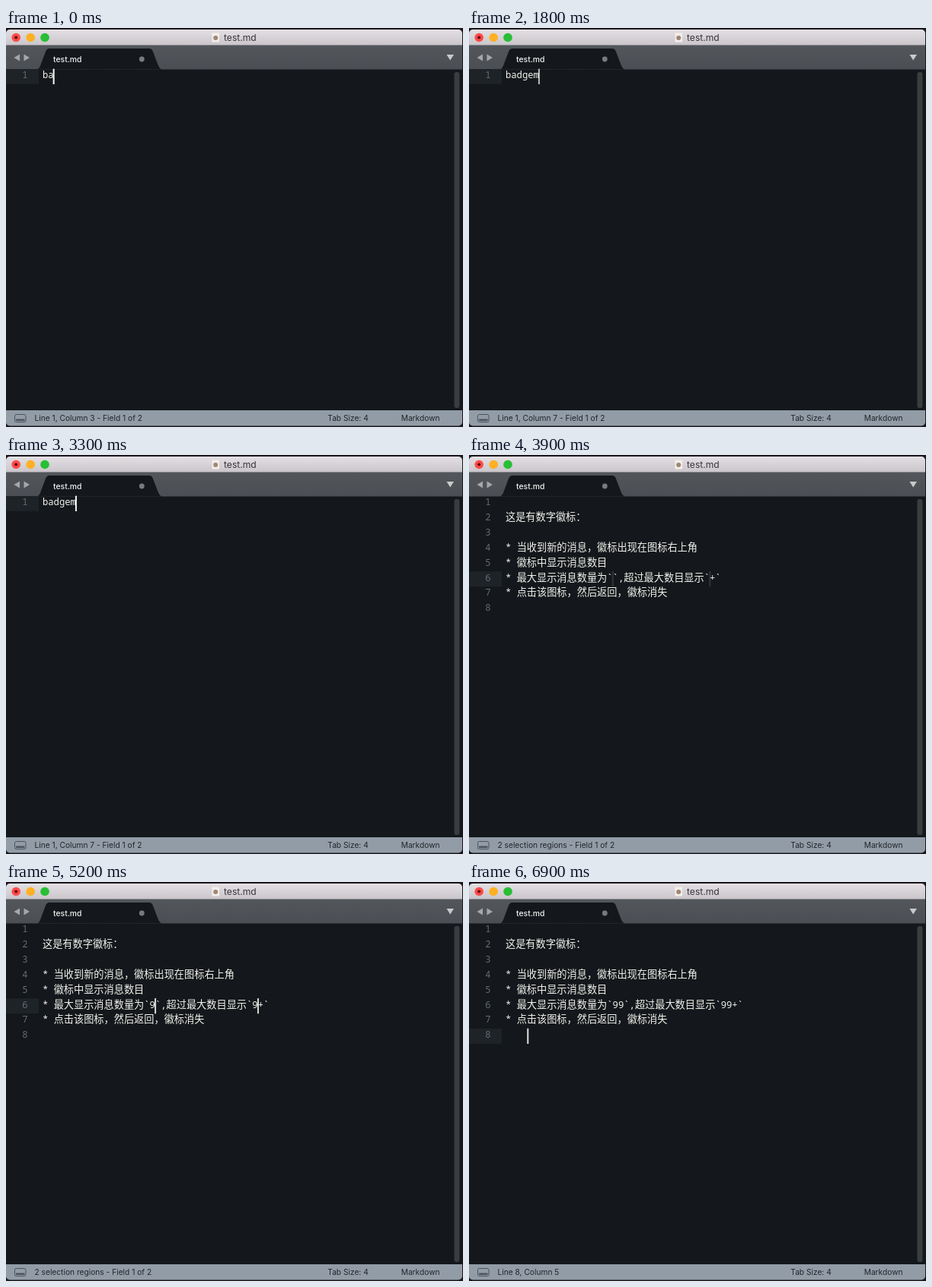
These frames come from a looping animation (600x525 px, 7 s). An HTML page:

```html
<!DOCTYPE html>
<html lang="zh-CN">
<head>
<meta charset="utf-8">
<title>test.md</title>
<style>
  html, body { margin: 0; width: 100%; height: 100%; overflow: hidden; background: #1b171c; }
  svg { display: block; }
  text { white-space: pre; }
  .ui { font-family: Inter, "Liberation Sans", sans-serif; }
  .code { font: 12.2px "Noto Sans Mono", "DejaVu Sans Mono", monospace; fill: #f3f3ed; }
  .cjk { font: 13.2px "Noto Sans CJK SC", "Noto Sans CJK", sans-serif; }
  .num { fill: #656b70; text-anchor: end; }
  .status { font-size: 10.2px; fill: #20252a; }
</style>
</head>
<body>
<svg width="600" height="525" viewBox="0 0 600 525">
  <defs>
    <linearGradient id="title" x2="0" y2="1">
      <stop stop-color="#e3dfe3"/><stop offset="1" stop-color="#c9c5ca"/>
    </linearGradient>
    <linearGradient id="tabs" x2="0" y2="1">
      <stop stop-color="#53575b"/><stop offset="1" stop-color="#4b4f54"/>
    </linearGradient>
    <clipPath id="window"><rect y="2" width="599" height="521.5" rx="5"/></clipPath>
  </defs>
  <rect width="600" height="525" fill="#1b171c"/>
  <g clip-path="url(#window)">
    <rect width="600" height="525" fill="#14181c"/>
    <rect y="2" width="600" height="21" fill="url(#title)"/>
    <rect y="22.5" width="600" height="32" fill="url(#tabs)"/>
    <path d="M41 54.5C44 53 45 50 46 47L52 31Q53.5 27 57 27H188Q191 27 192.500 30L199 47C201 52 202 53.500 204.500 54.500Z" fill="#14181c"/>
    <rect y="503" width="600" height="21" fill="#929ca7"/>
  </g>

  <circle cx="13.200" cy="12.500" r="5.800" fill="#fc4b48"/>
  <circle cx="13.200" cy="12.500" r="2.100" fill="#690b0c"/>
  <circle cx="32.200" cy="12.500" r="5.800" fill="#fdb024"/>
  <circle cx="51" cy="12.500" r="5.800" fill="#28bf34"/>
  <rect x="270.500" y="6.500" width="9.500" height="12" fill="#f2eeea"/>
  <circle cx="275.200" cy="13" r="3" fill="#a08674"/>
  <text class="ui" x="286" y="17" font-size="12.100" fill="#38353a">test.md</text>

  <path d="M18 34.500V43.500L10.500 39ZM23.500 34.500V43.500L31 39Z" fill="#a5a8aa"/>
  <path d="M578.500 35H588L583.200 42.500Z" fill="#c8cacb"/>
  <text class="ui" x="62" y="44.500" font-size="10.400" font-weight="500" fill="#f1f2f2">test.md</text>
  <circle cx="178.300" cy="41" r="3.400" fill="#777b7e"/>
  <rect x="588.500" y="58" width="7" height="442" rx="3" fill="#393d40"/>

  <rect x="11.500" y="508.500" width="14.500" height="10" rx="2" fill="none" stroke="#4b535b"/>
  <path d="M13 514.500H24.500V517H13Z" fill="#4b535b"/>
  <text class="ui status" id="info" x="37.500" y="517.300"></text>
  <text class="ui status" x="422.300" y="517.300">Tab Size: 4</text>
  <text class="ui status" x="518.700" y="517.300">Markdown</text>

  <g id="editor"></g>
</svg>
<script>
const LOOP = 7000, STEP = 100, LEFT = 48, COL = 7.32, WIDE = 13.2, ROW = 19.85, TOP = 54;
const editor = document.getElementById('editor');
const info = document.getElementById('info');

const isWide = c => c.charCodeAt(0) > 255;
const measure = s => [...s].reduce((w, c) => w + (isWide(c) ? WIDE : COL), 0);

function add(parent, tag, attrs, text) {
  const el = document.createElementNS('http://www.w3.org/2000/svg', tag);
  for (const k in attrs) el.setAttribute(k, attrs[k]);
  if (text) el.textContent = text;
  return parent.appendChild(el);
}

const word = (time, text) => ({
  time, lines: [text], carets: [[0, text]],
  status: `Line 1, Column ${text.length + 1} - Field 1 of 2`
});

const snippet = digits => [
  '', '这是有数字徽标：', '',
  '* 当收到新的消息，徽标出现在图标右上角',
  '* 徽标中显示消息数目',
  `* 最大显示消息数量为\`${digits}\`,超过最大数目显示\`${digits}+\``,
  '* 点击该图标，然后返回，徽标消失', ''
];

function fields(time, digits) {
  const lines = snippet(digits), row = lines[5];
  return {
    time, lines, status: '2 selection regions - Field 1 of 2',
    carets: [[5, row.slice(0, row.indexOf(','  ) - 1)], [5, row.slice(0, -2)]]
  };
}

const ending = (time, indent) => ({
  time, lines: snippet('99'), carets: [[7, indent]],
  status: `Line 8, Column ${indent.length + 1}`
});

// Each entry is one key press; the caret blink restarts with it.
const states = [
  word(-260, 'ba'),
  word(1100, 'bad'), word(1200, 'badg'), word(1400, 'badge'), word(1490, 'badgem'),
  fields(3400, ''), fields(4915, '9'), fields(5300, '99'),
  ending(5800, ''), ending(6115, '    ')
];

function blink(age) {
  const p = age % 850, low = 0.13;
  if (p < 260) return 1;
  if (p < 420) return 1 - (1 - low) * (p - 260) / 160;
  if (p < 600) return low;
  return Math.min(1, low + (1 - low) * (p - 600) / 210);
}

let shown, carets = [];

function build(state) {
  editor.replaceChildren();
  info.textContent = state.status;
  const active = state.carets[0][0];
  add(editor, 'rect', { x: 0, y: TOP + active * ROW, width: 43, height: ROW, fill: '#1e2328' });
  state.lines.forEach((line, i) => {
    const y = TOP + 12.3 + i * ROW;
    add(editor, 'text', { class: 'code num', x: 28.6, y }, String(i + 1));
    const text = add(editor, 'text', { class: 'code', x: LEFT, y });
    for (const run of line.match(/[\x00-\xff]+|[^\x00-\xff]+/g) || [])
      add(text, 'tspan', isWide(run) ? { class: 'cjk' } : {}, run);
  });
  carets = state.carets.map(([row, before]) => add(editor, 'rect', {
    x: LEFT - 1 + measure(before), y: TOP - 0.3 + row * ROW, width: 2, height: 20.3, fill: '#f8f8f2'
  }));
  shown = state;
}

const start = performance.now();

function draw() {
  const t = Math.floor((performance.now() - start) % LOOP / STEP) * STEP;
  const state = states.findLast(s => s.time <= t);
  if (state !== shown) build(state);
  for (const c of carets) c.setAttribute('opacity', blink(t - state.time));
  requestAnimationFrame(draw);
}
draw();
</script>
</body>
</html>
```
